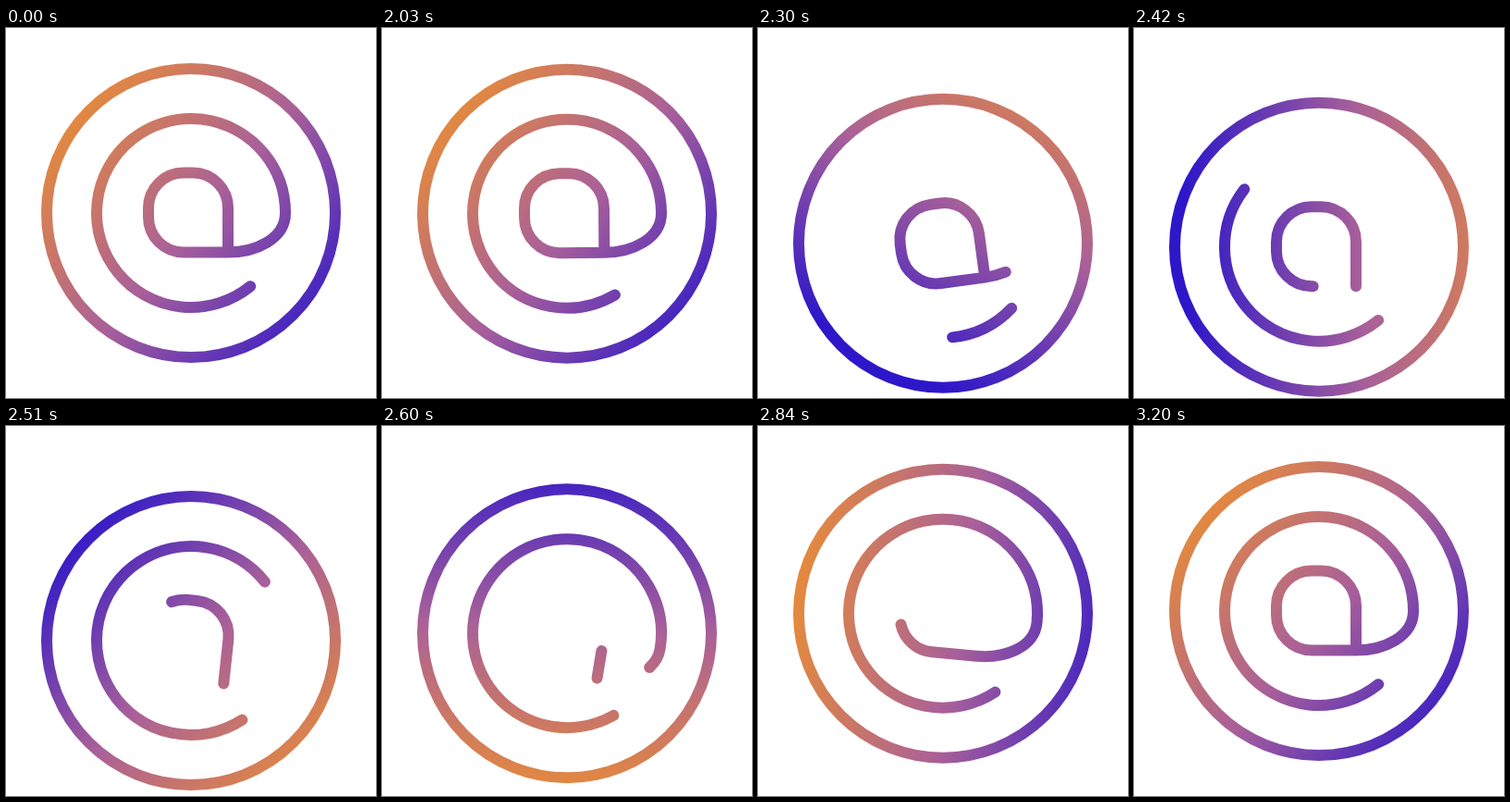
These frames come from a looping animation (400x400 px, 3.23 s). An HTML page with a canvas:

```html
<!DOCTYPE html>
<html lang="en">
<head>
<meta charset="utf-8">
<title>At sign</title>
<style>
  html, body { margin: 0; width: 100%; height: 100%; overflow: hidden; background: #fff; }
  canvas { display: block; width: 400px; height: 400px; }
</style>
</head>
<body>
<canvas id="stage" width="400" height="400"></canvas>
<script>
const ctx = document.getElementById('stage').getContext('2d');
const LOOP = 3230, HOLD = 2000, STEP = 30;
const RAD = Math.PI / 180;
const FAR = 2000;
const GRADIENT_LENGTH = 380;

// Each track lists [step, value] keys, eased in and out between neighbours.
const tracks = {
  drop: [[0, 0], [12.7, 37.2], [31, 0]],
  tilt: [[0, 0], [7.5, -9.5], [20.5, 9.5], [37, 0]],
  hue: [[0, 40], [32.5, 387], [40, 400]],
  shift: [[0, 0.47], [12, 0.65], [20, 0.48], [28, 0.45], [40, 0.47]],
  erase: [[0, 0], [10.4, 612], [22.8, 940]],
  redraw: [[6.9, 0], [20.9, 580], [37, 940]]
};

function valueAt(keys, n) {
  if (n <= keys[0][0]) return keys[0][1];
  for (let i = 1; i < keys.length; i++) {
    const [n0, v0] = keys[i - 1], [n1, v1] = keys[i];
    if (n <= n1) {
      const u = (n - n0) / (n1 - n0);
      return v0 + (v1 - v0) * u * u * (3 - 2 * u);
    }
  }
  return keys[keys.length - 1][1];
}

function makeAtSign() {
  const p = new Path2D();
  const left = -46, right = 40, top = -43.5, bottom = 42.5, r = 38;
  p.arc(0, 0, 102, 51 * RAD, 360 * RAD);
  p.bezierCurveTo(102, 28, 70, bottom, right, bottom);
  p.lineTo(left + r, bottom);
  p.arc(left + r, bottom - r, r, 90 * RAD, 180 * RAD);
  p.arc(left + r, top + r, r, 180 * RAD, 270 * RAD);
  p.arc(right - r, top + r, r, 270 * RAD, 360 * RAD);
  p.lineTo(right, bottom);
  return p;
}

const atSign = makeAtSign();
const ring = new Path2D();
ring.arc(0, 0, 156, 0, 360 * RAD);

function makeGradient(degrees, shift) {
  const dx = Math.cos(degrees * RAD) * GRADIENT_LENGTH;
  const dy = Math.sin(degrees * RAD) * GRADIENT_LENGTH;
  const g = ctx.createLinearGradient(-shift * dx, -shift * dy, (1 - shift) * dx, (1 - shift) * dy);
  g.addColorStop(0, 'rgb(232,140,56)');
  g.addColorStop(0.5, 'rgb(169,96,153)');
  g.addColorStop(1, 'rgb(46,23,201)');
  return g;
}

function strokePart(path, from, to) {
  if (to <= from) return;
  ctx.setLineDash([to - from, FAR]);
  ctx.lineDashOffset = -from;
  ctx.stroke(path);
}

function draw(time) {
  const n = Math.max(0, Math.floor((time % LOOP - HOLD) / STEP));
  const at = name => valueAt(tracks[name], n);
  const tilt = at('tilt');

  ctx.setTransform(1, 0, 0, 1, 0, 0);
  ctx.fillStyle = '#fff';
  ctx.fillRect(0, 0, 400, 400);
  ctx.translate(200, 200 + at('drop'));
  ctx.lineWidth = 12;
  ctx.lineCap = ctx.lineJoin = 'round';

  ctx.setLineDash([]);
  ctx.strokeStyle = makeGradient(at('hue'), at('shift'));
  ctx.stroke(ring);

  // Undo the tilt so the colours stay aligned with the ring.
  ctx.rotate(tilt * RAD);
  ctx.strokeStyle = makeGradient(at('hue') - tilt, at('shift'));
  strokePart(atSign, at('erase'), FAR);
  strokePart(atSign, 0, at('redraw'));
}

const start = performance.now();
function tick() {
  draw(performance.now() - start);
  requestAnimationFrame(tick);
}
tick();
</script>
</body>
</html>
```
